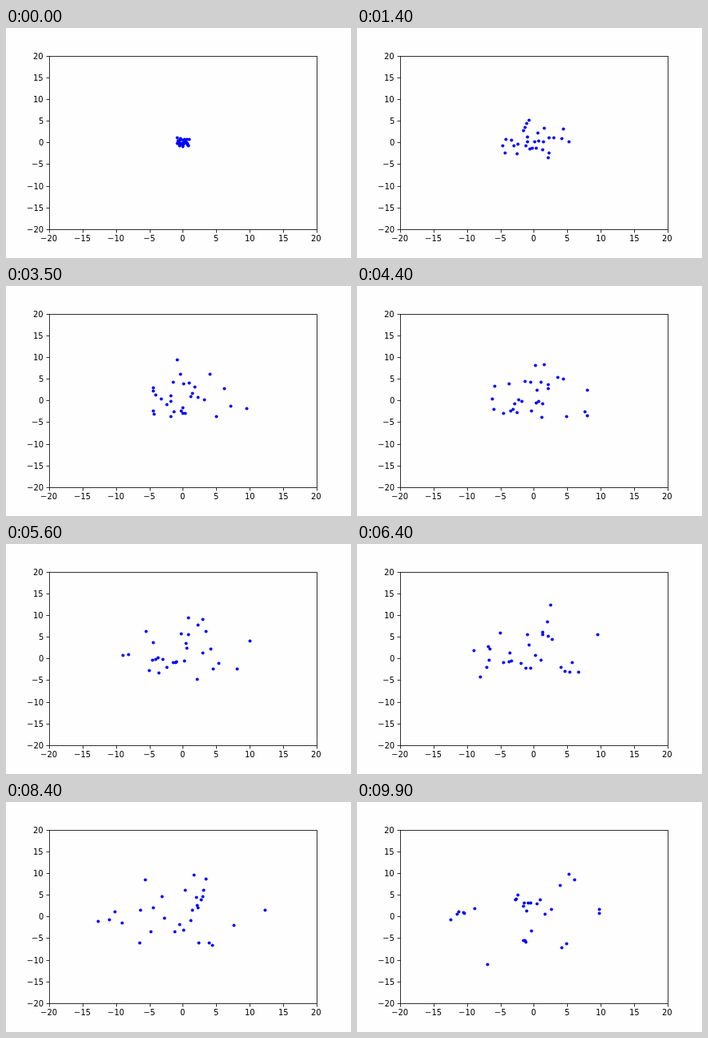
These frames come from a looping animation (432 px wide and 288 px high, 10000 ms). An HTML page with a canvas:

```html
<!DOCTYPE html>
<html lang="en">
<head>
<meta charset="utf-8">
<title>Random walk</title>
<style>
html, body { margin: 0; width: 100%; height: 100%; overflow: hidden; background: #fefefe; }
canvas { display: block; width: 432px; height: 288px; }
</style>
</head>
<body>
<canvas id="stage" width="432" height="288"></canvas>
<script>
const ctx = document.getElementById('stage').getContext('2d');
const LEFT = 54, RIGHT = 388.8, TOP = 34.56, BOTTOM = 252;
const LIMIT = 20, STEP_MS = 100, STEPS = 100;

const toX = v => LEFT + (v + LIMIT) * (RIGHT - LEFT) / (2 * LIMIT);
const toY = v => BOTTOM - (v + LIMIT) * (BOTTOM - TOP) / (2 * LIMIT);
const snap = v => Math.floor(v + 0.5) + 0.5;

// Where the swarm drifts to: groups of walkers around a few centres
const groups = [
  { count: 12, x: 0, y: 3, spread: 3 },
  { count: 6, x: -10.5, y: 0, spread: 2 },
  { count: 4, x: -1.5, y: -4.5, spread: 1.5 },
  { count: 3, x: 5, y: 8.5, spread: 1.5 },
  { count: 2, x: 8.5, y: 1, spread: 1.5 },
  { count: 2, x: 4.5, y: -7, spread: 1 },
  { count: 1, x: -6.5, y: -11, spread: 0.5 }
];

let seed = 20417;
function random() {
  seed = (seed + 0x6D2B79F5) | 0;
  let r = Math.imul(seed ^ (seed >>> 15), 1 | seed);
  r = (r + Math.imul(r ^ (r >>> 7), 61 | r)) ^ r;
  return ((r ^ (r >>> 14)) >>> 0) / 4294967296;
}
const jump = size => (random() * 2 - 1) * size;

// Uniform random steps, tilted so that the walk arrives at its end
function walk(end) {
  const raw = [jump(1)];
  for (let i = 1; i < STEPS; i++) raw.push(raw[i - 1] + jump(1));
  const tilt = (end - raw[STEPS - 1]) / (STEPS - 1);
  return raw.map((v, i) => v + tilt * i);
}

const paths = groups.flatMap(g => Array.from({ length: g.count }, () => ({
  x: walk(g.x + jump(g.spread)),
  y: walk(g.y + jump(g.spread))
})));

function line(x1, y1, x2, y2) {
  ctx.beginPath();
  ctx.moveTo(x1, y1);
  ctx.lineTo(x2, y2);
  ctx.stroke();
}

function drawAxes() {
  const l = snap(LEFT), r = snap(RIGHT), t = snap(TOP), b = snap(BOTTOM);
  ctx.strokeStyle = ctx.fillStyle = '#000';
  ctx.lineWidth = 0.8;
  ctx.strokeRect(l, t, r - l, b - t);
  ctx.font = '10px "DejaVu Sans", sans-serif';
  for (let v = -LIMIT; v <= LIMIT; v += 5) {
    const label = String(v).replace('-', '\u2212');
    const width = ctx.measureText(label).width;
    const x = snap(toX(v)), y = snap(toY(v));
    line(x, b, x, b + 4);
    line(l, y, l - 4, y);
    ctx.fillText(label, Math.round(toX(v) - width / 2), 267);
    ctx.fillText(label, Math.round(47 - width), Math.round(toY(v)) + 4);
  }
}

function drawDots(step) {
  ctx.fillStyle = '#00f';
  for (const p of paths) {
    ctx.beginPath();
    ctx.arc(Math.floor(toX(p.x[step])) + 0.5, Math.floor(toY(p.y[step])) + 0.5, 2, 0, Math.PI * 2);
    ctx.fill();
  }
}

function frame() {
  const step = Math.floor(performance.now() / STEP_MS) % STEPS;
  ctx.fillStyle = '#fefefe';
  ctx.fillRect(0, 0, 432, 288);
  drawDots(step);
  drawAxes();
  requestAnimationFrame(frame);
}
frame();
</script>
</body>
</html>
```
